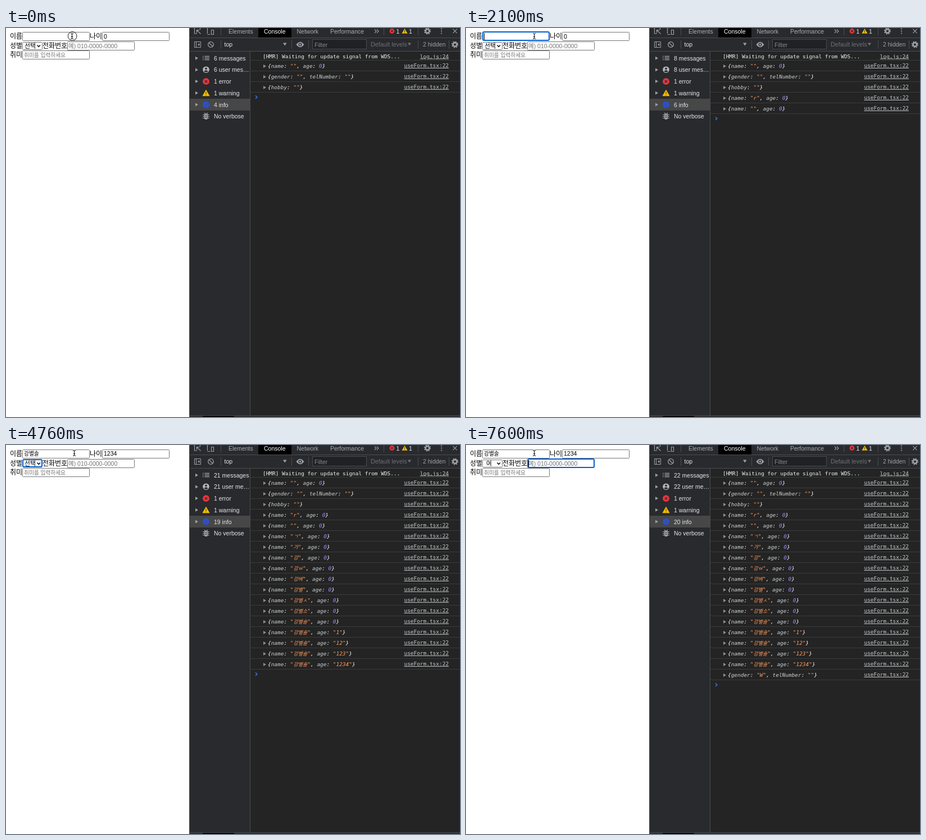
These frames come from a looping animation (808 px wide and 693 px high, 8 s). An HTML page:

```html
<!DOCTYPE html>
<html lang="ko">
<head>
<meta charset="utf-8">
<style>
html, body { margin: 0; width: 100%; height: 100%; overflow: hidden; background: #fff; }
svg { display: block; }
text { white-space: pre; }
.ui { font: 10.5px "Liberation Sans", "Noto Sans CJK KR", sans-serif; }
.label { font: 12px "Noto Sans CJK KR", "Noto Sans CJK", sans-serif; }
.ko { font: 9.7px "Noto Sans CJK KR", "Noto Sans CJK", sans-serif; }
.mono { font: 9.45px "DejaVu Sans Mono", "Noto Sans CJK KR", monospace; }
.item { font: 600 10px Inter, "Noto Sans CJK KR", sans-serif; }
.option { font: 700 10px "Noto Sans CJK KR", "Noto Sans CJK", sans-serif; }
.i { font-style: italic; }
.u { text-decoration: underline; }
.big { font-size: 10.8px; }
</style>
</head>
<body>
<svg id="stage" width="808" height="693" viewBox="0 0 808 693"></svg>
<script>
const NAME = '강별솔';
const TYPED = ['ㄱ', '가', '강', '강ㅂ', '강벼', '강별', '강별ㅅ', '강별소', NAME];
const nameLog = (name, age = 0) => ({ name, age });
const LOGS = [
  nameLog(''), { gender: '', telNumber: '' }, { hobby: '' },
  nameLog('r'), nameLog(''), ...TYPED.map(s => nameLog(s)),
  ...['1', '12', '123', '1234'].map(age => nameLog(NAME, age)),
  { gender: 'W', telNumber: '' }
];

// Each step changes part of the state; the rest carries over.
const typing = [1, 2, 4, 5, 6, 8, 9].map((n, i) =>
  [2250 + Math.round(i * 146.7), { name: TYPED[n - 1], logs: 5 + n }]);
const STEPS = [
  [0, { click: true, cursor: 117.5, name: '', age: '0', gender: '선택', logs: 3 }],
  [150, { click: false }],
  [450, { focus: 'name', caret: true, cursor: 121.5 }],
  [600, { suggest: true }],
  [1050, { suggest: false, name: 'r', logs: 4 }],
  [1500, { caret: false }],
  [1800, { name: '', logs: 5 }],
  [2100, { caret: true }],
  ...typing,
  [3280, { focus: 'age', caret: false, selected: true }],
  [3570, { age: '1', caret: true, selected: false }],
  [3720, { age: '12', logs: 16 }],
  [3860, { age: '123', logs: 17 }],
  [4010, { age: '1234', logs: 18 }],
  [4460, { caret: false }],
  [4760, { focus: 'gender' }],
  [5960, { menu: 1, hot: 1 }],
  [6250, { hot: 2 }],
  [6850, { hot: 0 }],
  [7000, { hot: 2 }],
  [7150, { menu: 0.5, gender: '여', logs: 19 }],
  [7300, { menu: 0 }],
  [7600, { focus: 'tel', caret: true }]
];

const rect = (x, y, w, h, fill, more = '') =>
  `<rect x="${x}" y="${y}" width="${w}" height="${h}" fill="${fill}" ${more}/>`;
const text = (x, y, s, cls, fill, more = '') =>
  `<text x="${x}" y="${y}" class="${cls}" fill="${fill}" ${more}>${s}</text>`;
const line = (d, color, width = 1) =>
  `<path d="${d}" fill="none" stroke="${color}" stroke-width="${width}"/>`;
const shape = (d, fill) => `<path d="${d}" fill="${fill}"/>`;
const dot = (x, y, r, fill, more = '') =>
  `<circle cx="${x}" cy="${y}" r="${r}" fill="${fill}" ${more}/>`;
const isHangul = c => /[ㄱ-힣]/.test(c);
const textWidth = s => [...s].reduce((w, c) =>
  w + (isHangul(c) ? 8.9 : /\d/.test(c) ? 5.84 : 3.5), 0);

const GREY = '#9aa0a6', LIGHT = '#e4e6e9', EDGE = '#494c50', PANEL = '#292a2d';

// The focus ring reaches one pixel above the field.
function box(x, y, w, h, focused) {
  return focused
    ? rect(x + 1, y, w - 2, h - 1, '#fff', 'rx="2" stroke="#005fcc" stroke-width="2"')
    : rect(x + .5, y + .5, w - 1, h - 1, '#fff', 'rx="1" stroke="#767676"');
}

const caret = (x, y) => rect(x, y, 1, 12, '#000');

function form(s) {
  // Hangul in the first field makes its line one pixel taller.
  const dy = s.name && isHangul(s.name[0]) ? 1 : 0;
  const on = id => s.focus === id;
  const label = (x, y, str) => text(x, y + dy, str, 'label', '#000');
  let out = label(7, 18.5, '이름') + label(149, 18.5, '나이') +
    label(7, 35.5, '성별') + label(65, 35.5, '전화번호') + label(7, 51.5, '취미');

  out += box(29, 7 + dy, 120, 16, on('name')) +
    text(32, 18.5, s.name, dy ? 'ko' : 'ui', '#000');
  if (on('name') && s.caret) out += caret(32 + textWidth(s.name), 9 + dy);

  out += box(171, 7 + dy, 120, 16, on('age'));
  if (s.selected) out += rect(174, 9 + dy, 6, 12, '#b3d7ff');
  out += text(174, 19, s.age, 'ui', '#000');
  if (on('age')) {
    out += rect(277.5, 10.5, 8, 10, '#f4f4f4', 'rx="3" stroke="#ccc"') +
      line('M279.5 14l2-2 2 2M279.5 17l2 2 2-2', '#444', 1.2);
    if (s.caret) out += caret(174 + textWidth(s.age), 9 + dy);
  }

  out += box(29, 25 + dy, 36, 14, on('gender')) +
    text(s.gender === '여' ? 36 : 33, 35.5 + dy, s.gender, 'ko big', '#000') +
    line(`M55.5 ${30.5 + dy}l2.7 2.8 2.7-2.8`, '#111', 1.6);

  out += box(109, 24 + dy, 120, 16, on('tel')) +
    text(111, 35.5 + dy, '예) 010-0000-0000', 'ui', '#757575');
  if (on('tel') && s.caret) out += caret(111, 26 + dy);

  return out + box(29, 40 + dy, 120, 16) +
    text(32, 51.5 + dy, '취미를 입력하세요', 'ko', '#757575');
}

function suggestions() {
  const items = ['mirel', NAME, 'Vanilla', 'Byulsol-Kang(GridChum)', 'byulsolk', 'Storybook'];
  return rect(28.5, 24.5, 159, 182, '#292a2e',
    'rx="3" stroke="#55575b" style="filter:drop-shadow(0 1px 1px #0005)"') +
    items.map((s, i) => text(38, 48.7 + i * 28.3, s, 'item', '#eceef0')).join('');
}

function menu(s) {
  const options = ['선택', '남', '여', '기타'];
  let out = rect(20, 21, 52, 64, '#8b8b8b',
    'rx="5" style="filter:drop-shadow(0 2px 3px #0004)"');
  if (s.hot) out += rect(20, 24 + s.hot * 14, 52, 14.3, '#2f78e8');
  out += line('M25.5 31l2 2.7 3.8-5.8', '#fff', 1.3) +
    options.map((o, i) => text(37, 34.6 + i * 14, o, 'option', '#fff')).join('');
  return `<g opacity="${s.menu}">${out}</g>`;
}

function cursor(s) {
  const x = s.cursor;
  const d = `M${x - 2.5} 9.5q2.5 0 2.5 2v6q0 2-2.5 2M${x + 2.5} 9.5q-2.5 0-2.5 2v6q0 2 2.5 2M${x - 1.5} 15.5h3`;
  return (s.click ? dot(118.2, 14.5, 7.8, 'none', 'stroke="#111"') : '') +
    line(d, '#fff', 2.4) + line(d, '#000');
}

function gear(x, y) {
  return dot(x, y, 3.4, 'none', `stroke="${GREY}" stroke-width="2.6"`) +
    dot(x, y, 5.2, 'none', `stroke="${GREY}" stroke-width="1.8" stroke-dasharray="2.04 2.04"`);
}

const cross = (x, y, r, c) =>
  line(`M${x - r} ${y - r}l${2 * r} ${2 * r}m0 ${-2 * r}l${-2 * r} ${2 * r}`, c, 1.2);
const error = (x, y, r) => dot(x, y, r, '#e8353e') + cross(x, y, r * .36, PANEL);
const warning = (x, y, r) =>
  shape(`M${x} ${y - r}l${r * 1.1} ${r * 1.9}h${-r * 2.2}z`, '#f5bd00') +
  rect(x - .5, y - r * .35, 1, r * .65, PANEL) + rect(x - .5, y + r * .5, 1, 1, PANEL);

function toolbars() {
  const tab = (x, s, fill = '#a9aeb4') => text(x, 9.7, s, 'ui', fill);
  return rect(326, 0, 482, 41, PANEL) + rect(449, 0, 59, 17, '#000') +
    line('M326 17.5h482M326 41.5h482', EDGE) +
    line('M340 10h-4.5v-10M345.5 3v-3M339.5 3.5l7 7M339.5 8.5v-5h5', GREY, 1.2) +
    line('M358.5 10v-10M358.5 11.5h5M365.5 3.5h4v8h-4z', GREY, 1.2) +
    line('M382.5 0v13M672.5 0v13M733.5 0v13', EDGE) +
    tab(396, 'Elements') + tab(459, 'Console', '#fff') + tab(517.5, 'Network') +
    tab(577, 'Performance') +
    line('M656 2.5l3 3.2-3 3.2M660 2.5l3 3.2-3 3.2', GREY, 1.2) +
    error(687, 5.5, 4.4) + tab(694.5, '1', LIGHT) + warning(709.5, 5.5, 4.6) + tab(717, '1', LIGHT) +
    gear(750, 5.5) + [1.5, 5.5, 9.5].map(y => dot(775, y, 1.1, GREY)).join('') +
    cross(799, 5.5, 3.6, GREY) +
    line('M335.5 24.5h11v10h-11zM338.5 24.5v10', GREY) + shape('M344.5 27v5l-3.5-2.5z', GREY) +
    dot(364.5, 29.5, 4.8, 'none', `stroke="${GREY}" stroke-width="1.3"`) +
    line('M361.2 26.2l6.6 6.6', GREY, 1.3) +
    line('M382.5 22v15M508.5 22v15M538.5 22v15', EDGE) +
    text(388.5, 33, 'top', 'ui', LIGHT) + shape('M493 26.5h6.5l-3.2 5z', GREY) +
    shape('M516.5 29.5q7-9.5 14 0q-7 9.5-14 0z', GREY) +
    dot(523.5, 29.5, 2.3, GREY, `stroke="${PANEL}" stroke-width="1.3"`) +
    rect(545.5, 20.5, 96, 17, '#202124', `stroke="${EDGE}"`) +
    text(549, 33.5, 'Filter', 'ui', '#85898e') +
    text(649, 33, 'Default levels', 'ui big', '#6c7075') +
    shape('M715 26.5h6l-3 5z', '#6c7075') + line('M733.5 22v15M788.5 22v15', EDGE) +
    text(742, 33, '2 hidden', 'ui', GREY) + gear(799, 29.5);
}

function sidebar(n) {
  const total = n + 3, y = i => 53.7 + i * 20.7;
  const rows = [`${total} messages`, `${total} user me${total < 10 ? 's' : ''}…`,
    '1 error', '1 warning', `${n + 1} info`, 'No verbose'];
  return rect(327, 42, 107, 648, PANEL) + rect(327, 126, 107, 21, '#474747') +
    line('M434.5 42v648', EDGE) +
    rows.map((r, i) => text(370, y(i) + 4, r, 'ui', LIGHT) +
      (i < 5 ? shape(`M337 ${y(i) - 3}l5 3-5 3z`, GREY) : '')).join('') +
    line('M350 50.5h1.5m2 0h8.5M350 53.5h1.5m2 0h8.5M350 56.5h1.5m2 0h8.5', GREY, 1.3) +
    dot(356, 74.2, 5.8, '#b4b7bb') + dot(356, 72.3, 1.9, PANEL) +
    shape('M352.2 77.2q3.8-4 7.6 0q-3.8 3-7.6 0z', PANEL) +
    error(356, 95.2, 5.9) + warning(356, 115.8, 6) +
    dot(356, 136.5, 5.9, '#2b50d0') +
    rect(355.4, 135.5, 1.3, 4, '#474747') + rect(355.4, 133, 1.3, 1.3, '#474747') +
    rect(352.7, 152.5, 6.6, 10.5, GREY, 'rx="3"') +
    line('M350 154.5h12M350 157.5h12M350 160.5h12M353 151l2 2M359 151l-2 2', GREY, 1.2) +
    line('M354.5 156h3M354.5 159h3', PANEL);
}

function entry(log) {
  const span = (s, fill) => `<tspan fill="${fill}">${s}</tspan>`;
  const value = v => v === 0 ? span(0, '#a18bff')
    : span(`"${v.replace(/[ㄱ-힣]+/g, '<tspan font-size="9">$&</tspan>')}"`, '#ff9a5c');
  return '{' + Object.entries(log).map(([k, v]) => `${span(k, '#cccfd3')}: ${value(v)}`).join(', ') + '}';
}

function consoleLog(n) {
  const link = (y, s) => text(788, y, s, 'mono u', '#c6c9cd', 'text-anchor="end"');
  let out = text(457, 53.5, '[HMR] Waiting for update signal from WDS...', 'mono', '#eef0f2') +
    link(53.5, 'log.js:24') + line('M435 57.5h373', '#3a3b3d');
  LOGS.slice(0, n).forEach((log, i) => {
    const y = 67.5 + i * 19;
    out += shape(`M458 ${y - 2.5}l5 3-5 3z`, '#8a8d91') +
      text(466, y + 3.5, entry(log), 'mono i', '#fff') +
      link(y + 2.5, 'useForm.tsx:22') + line(`M435 ${y + 9}h373`, '#3a3b3d');
  });
  return out + line(`M444 ${63.5 + n * 19}l3 2.7-3 2.7`, '#367cf1', 1.4);
}

function draw(s) {
  return form(s) + (s.suggest ? suggestions() : '') + (s.menu ? menu(s) : '') + cursor(s) +
    rect(326, 0, 482, 693, '#242424') + toolbars() + sidebar(s.logs) + consoleLog(s.logs) +
    rect(326, 690, 482, 3, PANEL) + line('M326 690.5h482', EDGE) + rect(350, 691, 56, 2, '#000') +
    line('M326.5 0v693', EDGE);
}

const stage = document.getElementById('stage');
let shown = 0;
function frame() {
  const t = performance.now() % 8000;
  const past = STEPS.filter(([at]) => at <= t);
  if (past.length !== shown) {
    shown = past.length;
    stage.innerHTML = draw(Object.assign({}, ...past.map(p => p[1])));
  }
  requestAnimationFrame(frame);
}
frame();
</script>
</body>
</html>
```
